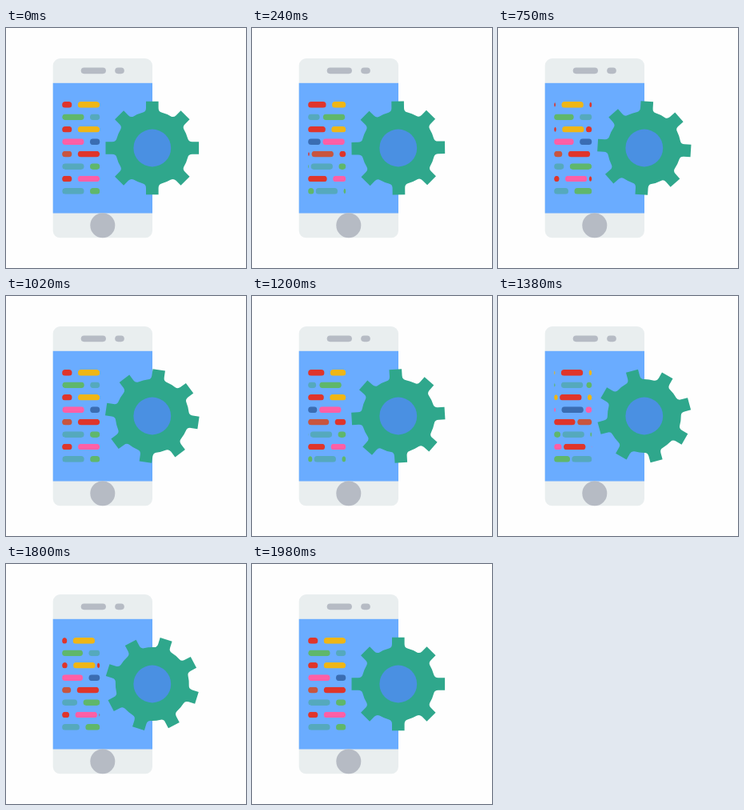
Write an HTML page that moves like this. It is 300x300 px and loops after 2.01 s.

```html
<!DOCTYPE html>
<html lang="en">
<head>
<meta charset="utf-8">
<title>Phone with gear and code</title>
<style>
  html, body { margin: 0; width: 100%; height: 100%; overflow: hidden; background: #fefefe; }
  svg { display: block; width: 100vw; height: 100vh; }
</style>
</head>
<body>
<svg viewBox="0 0 300 300">
  <rect x="58.7" y="38" width="124.3" height="224.3" rx="9" fill="#e9eeef"/>
  <rect x="58.7" y="68.8" width="124.3" height="162.7" fill="#6aacff"/>
  <g fill="#b6bbc4">
    <rect x="93.7" y="49.5" width="31.2" height="7.7" rx="3.85"/>
    <rect x="136.2" y="49.5" width="11.6" height="7.7" rx="3.85"/>
    <circle cx="120.8" cy="246.8" r="15.5"/>
  </g>
  <g id="rows"></g>
  <path id="gear" fill="#2fa78c"/>
  <circle cx="182.8" cy="150" r="23.4" fill="#4a90e2"/>
</svg>
<script>
const LOOP = 2010, STEP = 30, SPIN = 1950, SLIDE = 990;
const BAR = 27.3, GAP = 7.5, LEFT = 70.2, HEIGHT = 7.7;
const red = '#df352b', yellow = '#efb616', green = '#5fb76b', teal = '#55a9bd',
      pink = '#ff5fa6', blue = '#3a6db3', brown = '#c8553f';

// first colour, second colour, start x, gap before the pair repeats, easing handles
const specs = [
  [red, yellow, 55, 7.5, 1 / 3, 2 / 3],
  [green, teal, 70.2, 4.3, .31, .26],
  [red, yellow, 55, 2.5, 1 / 3, 2 / 3],
  [pink, blue, 70.2, 2.8, .31, .26],
  [brown, red, 55, 2.8, .37, .12],
  [teal, green, 70.2, 2.5, .66, .68],
  [red, pink, 55, 2.6, 1 / 3, .51],
  [teal, green, 70.2, 2.3, 1 / 3, 2 / 3]
];

const bar = (x, y, w, fill) =>
  `<rect x="${x}" y="${y}" width="${w}" height="${HEIGHT}" rx="${HEIGHT / 2}" fill="${fill}"/>`;

const rowsBox = document.getElementById('rows');
rowsBox.innerHTML = specs.map(([a, b, x, gap], i) => {
  const y = 92.05 + 15.43 * i;
  const period = 2 * BAR + GAP + gap;
  const pair = x => bar(x, y, BAR, a) + bar(x + BAR + GAP, y, BAR, b);
  return `<clipPath id="clip${i}">${bar(LEFT, y, 47, '#000')}</clipPath>
    <g clip-path="url(#clip${i})"><g class="row">${pair(x - period)}${pair(x)}</g></g>`;
}).join('');
const rows = rowsBox.querySelectorAll('.row');

const gear = document.getElementById('gear');
gear.setAttribute('d', gearPath());

function gearPath() {
  const tooth = [[-11.5, -44.5], [-7.8, -45.5], [-7.8, -50], [-7.8, -58.3],
                 [7.8, -58.3], [7.8, -50], [7.8, -45.5], [11.5, -44.5]];
  let d = '';
  for (let i = 0; i < 8; i++) {
    const c = Math.cos(i * Math.PI / 4), s = Math.sin(i * Math.PI / 4);
    const p = tooth.map(([x, y]) => `${x * c - y * s} ${x * s + y * c}`);
    d += `${i ? 'A46 46 0 0 1 ' : 'M'}${p[0]}Q${p[1]} ${p[2]}L${p[3]}L${p[4]}L${p[5]}Q${p[6]} ${p[7]}`;
  }
  return d + 'A46 46 0 0 1 -11.5 -44.5Z';
}

// cubic-bezier(x1, 0, x2, 1)
function ease(t, x1, x2) {
  let lo = 0, hi = 1, s = t;
  for (let i = 0; i < 24; i++) {
    s = (lo + hi) / 2;
    const r = 1 - s;
    if (3 * s * r * r * x1 + 3 * s * s * r * x2 + s ** 3 < t) lo = s; else hi = s;
  }
  return s * s * (3 - 2 * s);
}

function draw() {
  const t = Math.floor(performance.now() % LOOP / STEP) * STEP;
  const angle = 360 * Math.min(t / SPIN, 1);
  gear.setAttribute('transform', `translate(182.8 150) rotate(${angle})`);
  const phase = t % SLIDE / SLIDE;
  specs.forEach(([, , , gap, x1, x2], i) => {
    const shift = (2 * BAR + GAP + gap) * ease(phase, x1, x2);
    rows[i].setAttribute('transform', `translate(${shift} 0)`);
  });
  requestAnimationFrame(draw);
}
draw();
</script>
</body>
</html>
```
